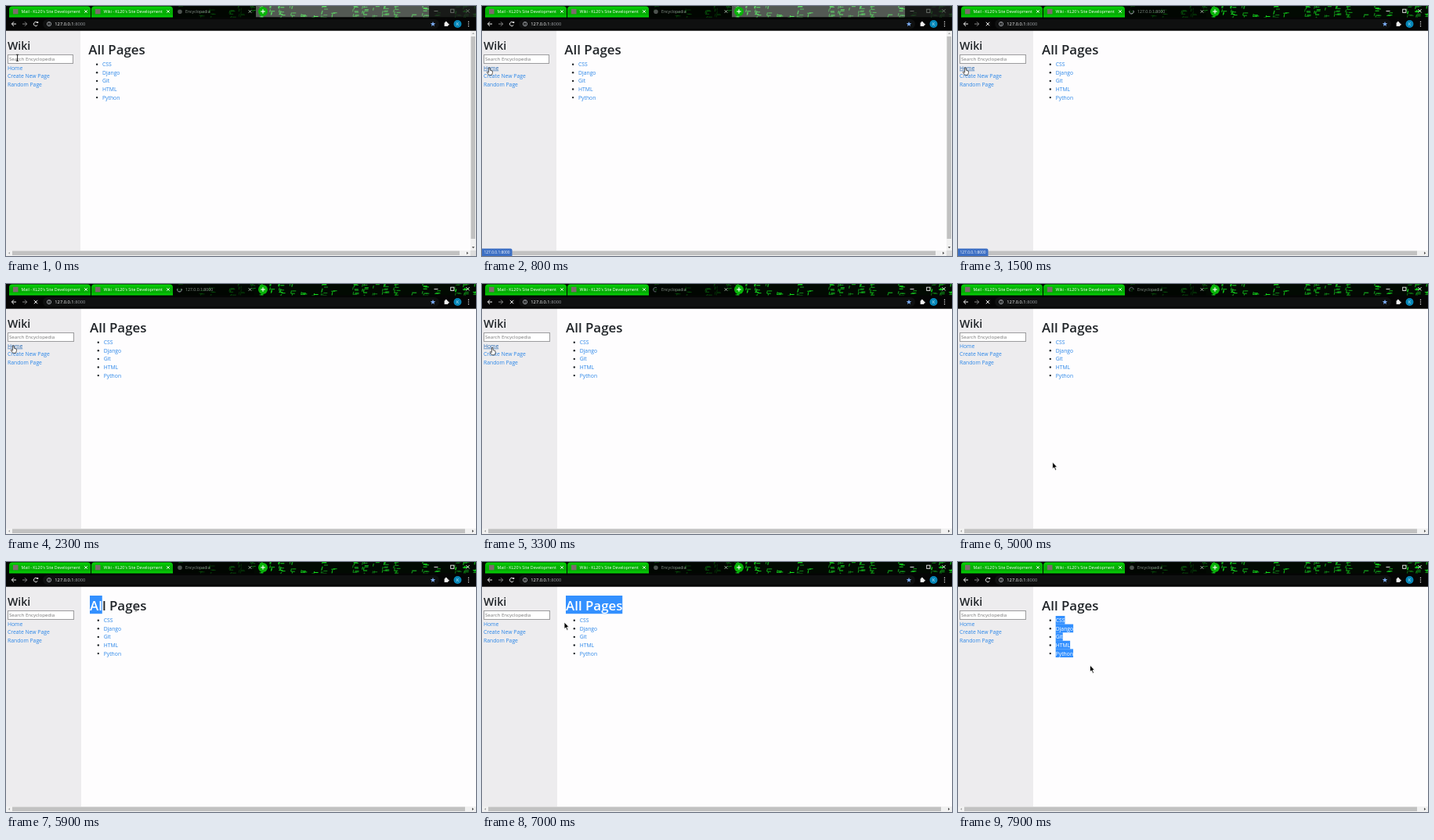
Animation of 600x320 px, one loop 8 s. Source, as an HTML page with a canvas:

```html
<!DOCTYPE html>
<html lang="en">
<head>
<meta charset="utf-8">
<title>Encyclopedia</title>
<style>
html, body { margin: 0; width: 600px; height: 320px; overflow: hidden; background: #fefdfe; }
canvas { display: block; }
</style>
</head>
<body>
<canvas id="stage" width="600" height="320"></canvas>
<script>
const c = document.getElementById('stage').getContext('2d');
const LOOP = 8000;
const SANS = '"Open Sans", "Noto Sans", sans-serif';
const LINK = '#2a86e8', HOVER = '#2064b0', SELECT = '#3390ff', INK = '#212529';

// Spans in which the screen is live; it holds still between them.
const LIVE = [[0, 800], [1400, 1800], [2000, 2800], [3100, 3900], [4000, 4800],
  [4900, 5500], [5700, 6500], [6600, 7400], [7600, 7900]];

// Pointer path: time, x, y of the hot spot.
const PATH = [[0, 14.5, 66.3], [800, 9.5, 79], [3100, 9.5, 79], [3500, 17, 84], [3900, 28, 88],
  [4000, 48, 82], [4200, 107, 58], [4800, 118, 184], [5100, 122, 250], [5500, 109, 55],
  [5700, 112, 56], [5900, 166, 59], [6100, 198, 62], [6300, 166, 72], [6500, 124, 77],
  [7000, 105, 77], [7400, 108, 72], [7600, 110, 71], [7900, 168.5, 132]];

const ITEMS = ['CSS', 'Django', 'Git', 'HTML', 'Python'];
const NAV = ['Home', 'Create New Page', 'Random Page'];
const HOST = '127.0.0.1', PORT = ':8000';

function rect(x, y, w, h, color) {
  c.fillStyle = color;
  c.fillRect(x, y, w, h);
}

function round(x, y, w, h, r, color) {
  c.fillStyle = color;
  c.beginPath();
  c.roundRect(x, y, w, h, r);
  c.fill();
}

function dot(x, y, r, color) {
  c.fillStyle = color;
  c.beginPath();
  c.arc(x, y, r, 0, Math.PI * 2);
  c.fill();
}

function arc(x, y, r, from, to, color, width = 1) {
  c.strokeStyle = color;
  c.lineWidth = width;
  c.beginPath();
  c.arc(x, y, r, from, to);
  c.stroke();
}

function line(points, color, width = 1) {
  c.strokeStyle = color;
  c.lineWidth = width;
  c.beginPath();
  for (let i = 0; i < points.length; i += 2) c.lineTo(points[i], points[i + 1]);
  c.stroke();
}

function shape(points, fill, stroke) {
  c.beginPath();
  for (let i = 0; i < points.length; i += 2) c.lineTo(points[i], points[i + 1]);
  c.closePath();
  c.fillStyle = fill;
  c.fill();
  c.strokeStyle = stroke;
  c.lineWidth = 0.8;
  c.stroke();
}

function text(str, x, y, size, color, weight = 400) {
  c.font = `${weight} ${size}px ${SANS}`;
  c.fillStyle = color;
  c.fillText(str, x, y);
  return c.measureText(str).width;
}

function cross(x, y, r, color, width = 1) {
  line([x - r, y - r, x + r, y + r], color, width);
  line([x + r, y - r, x - r, y + r], color, width);
}

function random(seed) {
  return () => {
    seed = (seed * 1664525 + 1013904223) >>> 0;
    return seed / 4294967296;
  };
}

function hold(t) {
  let q = Math.floor(t / 100) * 100;
  LIVE.forEach(([, end], i) => {
    const next = LIVE[i + 1];
    if (next && q > end && q < next[0]) q = end;
  });
  return q;
}

function pointer(t) {
  let i = 0;
  while (i < PATH.length - 2 && t >= PATH[i + 1][0]) i++;
  const [t0, x0, y0] = PATH[i], [t1, x1, y1] = PATH[i + 1];
  const k = Math.min(1, (t - t0) / (t1 - t0));
  return { x: x0 + (x1 - x0) * k, y: y0 + (y1 - y0) * k };
}

// Green code rain behind the tab strip.
function rain() {
  const rnd = random(77);
  for (let x = 218; x < 600; x += 13) {
    const lit = rnd();
    const dx = rnd() * 4;
    for (let y = -2 - rnd() * 3; y < 15; y += 6.5) {
      const show = rnd() < 0.75 && lit > 0.15;
      const alpha = (x < 316 ? 0.15 : 0.45) + lit * (x < 316 ? 0.4 : 0.5);
      const color = `rgba(20,${160 + Math.floor(rnd() * 80)},30,${alpha})`;
      for (let k = 0; k < 4; k++) {
        const px = x + dx + rnd() * 4, py = y + rnd() * 5;
        const flat = rnd() < 0.5;
        if (show) line([px, py, px + (flat ? 5 : -0.8), py + (flat ? 0 : 3.6)], color, 1.1);
      }
    }
  }
}

function tab(x, title) {
  const g = c.createLinearGradient(0, 0, 0, 14);
  g.addColorStop(0, '#08e008');
  g.addColorStop(0.35, '#04b404');
  g.addColorStop(0.75, '#04ac04');
  g.addColorStop(1, '#06d006');
  round(x, 0.5, 104, 14, [4, 4, 0, 0], g);
  rect(x + 5, 3.8, 6.5, 6.5, '#7c6c6c');
  text(title, x + 15.5, 9.2, 5.3, '#f6fff6');
  cross(x + 98, 7, 1.8, '#f0fff0', 0.9);
}

function chrome(t, loading) {
  const idle = t < 1400;
  rect(0, 0, 600, 15, '#020a02');
  rain();
  // Unfocused window: a pale veil over the empty strip.
  if (idle) {
    rect(319, 0, 221, 14.5, 'rgba(255,255,255,.32)');
    rect(540, 0, 60, 14.5, 'rgba(30,30,30,.8)');
  }
  rect(0, 14.5, 600, 17.2, '#050505');
  tab(4, "Mail - KL20's Site Development");
  tab(109, "Wiki - KL20's Site Development");

  round(214, 0.5, 103, 14, [4, 4, 0, 0], 'rgba(0,0,0,.4)');
  const naming = t >= 1500 && t < 2700;
  if (loading) {
    const a = t / 100 * 0.8;
    arc(221.5, 7.2, 2.8, a, a + 4, naming ? '#b8c0c8' : '#68707a', 0.9);
  } else {
    dot(222, 7.2, 2.8, '#4c524e');
  }
  text(naming ? HOST + PORT : 'Encyclopedia', 229, 9.2, 5.2, '#8f9a92');
  cross(311.5, 7, 1.8, '#b0c8b0', 0.9);

  dot(328, 7, 6, '#08b408');
  line([325.2, 7, 330.8, 7], '#fff', 1.1);
  line([328, 4.2, 328, 9.8], '#fff', 1.1);

  const ctl = idle ? '#6f756f' : '#f2f2f2';
  line([546.5, 6.5, 551.5, 6.5], ctl, 0.9);
  c.strokeStyle = ctl;
  c.strokeRect(567.7, 4.2, 4.2, 4.2);
  cross(589.5, 6.3, 2.2, ctl, 0.9);

  line([13, 23, 7.4, 23], '#f4f4f4');
  line([10, 20.3, 7.3, 23, 10, 25.7], '#f4f4f4');
  line([21, 23, 26.6, 23], '#858585');
  line([24, 20.3, 26.7, 23, 24, 25.7], '#858585');
  if (loading) {
    cross(38, 23, 2.2, '#f0f0f0');
  } else {
    arc(38, 23, 2.6, 0.5, 5.5, '#f0f0f0');
    rect(39.3, 20, 1.9, 1.9, '#f0f0f0');
  }

  round(47, 17, 506, 12, 6, '#0f1010');
  arc(55, 23, 2.6, 0, 7, '#b8bcc0', 0.8);
  rect(54.6, 22.5, 0.9, 2, '#b8bcc0');
  rect(54.6, 21.1, 0.9, 0.8, '#b8bcc0');
  const w = text(HOST, 62.3, 25.2, 5.75, '#fff');
  text(PORT, 62.3 + w, 25.2, 5.75, '#989ca0');

  c.fillStyle = '#7eaef5';
  c.beginPath();
  for (let i = 0; i < 10; i++) {
    const r = i % 2 ? 1.4 : 3.4, a = i * Math.PI / 5 - Math.PI / 2;
    c.lineTo(545 + r * Math.cos(a), 23.2 + r * Math.sin(a));
  }
  c.fill();

  rect(559.6, 21.3, 4.6, 4.6, '#f0f0f0');
  dot(561.8, 21, 1.2, '#f0f0f0');
  dot(564.5, 23.6, 1.2, '#f0f0f0');
  dot(576.5, 23, 5, '#0787b8');
  text('K', 574.9, 25, 5.2, '#d8f0fa');
  [20.3, 23, 25.7].forEach(y => dot(590.5, y, 0.75, '#e8e8e8'));
}

function scrollbars(wide) {
  const end = wide ? 600 : 593;
  rect(0, 313, 600, 7, '#f1f1f1');
  rect(8, 313.5, (wide ? 586 : 579) - 8, 5.5, '#c1c1c1');
  shape([5, 314.8, 5, 317.8, 3, 316.3], '#a5a5a5', 'transparent');
  shape([end - 5, 314.5, end - 5, 318, end - 2.7, 316.3], '#555', 'transparent');
  if (wide) return;
  rect(593, 31, 7, 282, '#f1f1f1');
  rect(593.5, 39, 5.5, 259, '#c1c1c1');
  shape([595, 36, 598, 36, 596.5, 34], '#a5a5a5', 'transparent');
  shape([594.8, 308, 598.2, 308, 596.5, 310.2], '#555', 'transparent');
  rect(593, 313, 7, 7, '#dcdcdc');
}

function heading(x, part) {
  const str = 'All Pages';
  c.font = `600 16.9px ${SANS}`;
  const w = c.measureText(str.slice(0, part)).width;
  text(str, x, 62, 16.9, INK, 600);
  if (!part) return;
  c.save();
  c.beginPath();
  c.rect(x, 43, w, 23.5);
  c.clip();
  rect(x, 43, w, 23.5, SELECT);
  text(str, x, 62, 16.9, '#fff', 600);
  c.restore();
}

function page(t, p, hover) {
  const wide = t >= 1400;
  const side = wide ? 96 : 95;
  const x = wide ? 107 : 105.3;
  rect(0, 31, 600, 289, '#fefdfe');
  rect(0, 31, side, 282, '#edecee');

  text('Wiki', 2, 56.2, 14.1, INK, 600);
  const box = wide ? 85 : 84;
  rect(2, 62, box, 12, '#9c9c9e');
  rect(3, 63, box - 2, 10, '#fff');
  text('Search Encyclopedia', 4, 70.3, 6.15, '#757575');
  NAV.forEach((s, i) => {
    const y = 81.7 + i * 10.6;
    const on = hover === i;
    const w = text(s, 2, y, 6.8, on ? HOVER : LINK);
    if (on) rect(2, y + 0.9, w, 0.6, HOVER);
  });

  let part = 0;
  if (t >= 5800 && t < 7400) part = t < 5900 ? 1 : t < 6000 ? 2 : t < 6100 ? 6 : 9;
  heading(x, part);

  ITEMS.forEach((s, i) => {
    const y = 77.2 + i * 10.6;
    const tx = x + 17.7;
    const on = t >= 7700 && p.y > y - 8;
    dot(x + 10.8, y - 2.5, 1.2, INK);
    if (on) {
      c.font = `400 6.8px ${SANS}`;
      rect(tx, y - 8.2, c.measureText(s).width, 10.7, SELECT);
    }
    text(s, tx, y, 6.8, on ? '#fff' : LINK);
  });
  scrollbars(wide);
}

function status(t, hover) {
  const fade = t < 2000 ? 1 : Math.max(0, 1 - (t - 1900) / 400);
  if (hover !== 0 || t < 500 || t >= 2300 || !fade) return;
  c.globalAlpha = fade;
  round(0, 310.5, 38.5, 9.5, [0, 2, 0, 0], '#3c6fc4');
  text(HOST + PORT, 2.5, 317.3, 4.9, '#fff');
  c.globalAlpha = 1;
}

function cursor(t, p, hover) {
  c.save();
  c.translate(p.x, p.y);
  if (hover >= 0 || (t >= 3100 && t <= 4200)) {
    shape([-0.8, 0, 0.6, 0, 0.9, 3.2, 3.6, 4, 4, 6.3, 3, 9.3, -1, 9.3, -3.2, 5.6, -2.4, 5, -0.9, 6.2],
      '#fff', '#333');
  } else if (t < 800 || (t >= 5400 && t < 6300)) {
    const color = t < 800 ? '#111' : '#777';
    line([0, -4, 0, 4], color, 0.9);
    line([-1.6, -4, 1.6, -4], color, 0.8);
    line([-1.6, 4, 1.6, 4], color, 0.8);
  } else {
    shape([0, 0, 0, 8.6, 2, 6.9, 3.5, 10.4, 5, 9.7, 3.5, 6.4, 5.9, 6.2], '#000', '#fff');
  }
  c.restore();
}

function draw(now) {
  const t = hold(now % LOOP);
  const p = pointer(t);
  const row = Math.floor((p.y - 74.5) / 10.6);
  const hover = p.x < 56 && row >= 0 && row < 3 ? row : -1;
  page(t, p, hover);
  chrome(t, t >= 1500 && t < 5100);
  status(t, hover);
  cursor(t, p, hover);
}

const start = performance.now();
function tick() {
  draw(performance.now() - start);
  requestAnimationFrame(tick);
}
tick();
</script>
</body>
</html>
```
